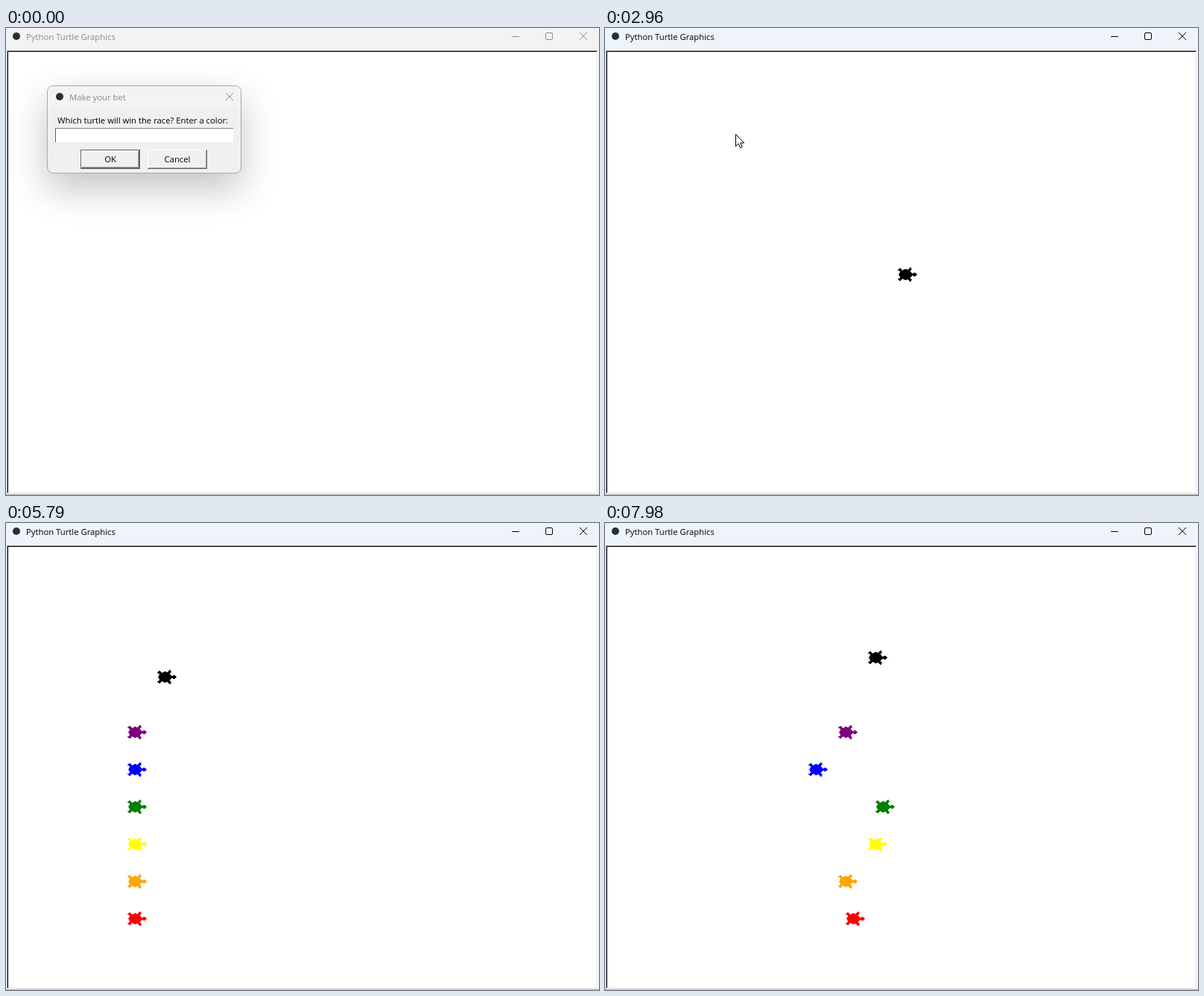
An HTML page for the animation above (8000 ms loop, 796 px wide and 626 px high).

```html
<!DOCTYPE html>
<html lang="en">
<head>
<meta charset="utf-8">
<title>Turtle race</title>
<style>
  html, body { margin: 0; width: 100%; height: 100%; overflow: hidden; background: #f0f0f0; }
  svg { position: absolute; display: block; }
  text { font: 11.3px "Open Sans", "Noto Sans", sans-serif; fill: #000; }
  .window {
    --on: 0;
    --ink: color-mix(in srgb, #000 calc(var(--on) * 100%), #8b8b8b);
    --bar: color-mix(in srgb, #eef4f9 calc(var(--on) * 100%), #f3f3f3);
  }
  .bar { fill: var(--bar); }
  .title { fill: var(--ink); }
  .glyph { fill: none; stroke: var(--ink); }
  .badge { fill: #22303a; }
  .middle { text-anchor: middle; }
  #stage, #overlay { left: 0; top: 0; }
  #dialog {
    position: absolute; left: 55px; top: 77px; width: 261px; height: 118px;
    box-sizing: border-box; border: 1px solid #a9a9a9; border-radius: 8px;
    overflow: hidden; background: #f0f0f0;
    box-shadow: 0 20px 50px rgb(0 0 0 / calc(.24 + .16 * var(--on)));
  }
  #dialog svg { left: -1px; top: -1px; }
</style>
</head>
<body>
<svg id="stage" class="window" width="796" height="626">
  <rect class="bar" width="796" height="30"/>
  <circle class="badge" cx="14" cy="11" r="5"/>
  <text class="title" x="27" y="16">Python Turtle Graphics</text>
  <path class="glyph" d="M679 11.5h10M770 6l10 10m0-10l-10 10"/>
  <rect class="glyph" x="724.5" y="6.5" width="9" height="9" rx="1.5"/>
  <g shape-rendering="crispEdges">
    <rect x="1" y="30" width="794" height="594" fill="#fff"/>
    <path d="M1.5 624V30.5H794" fill="none" stroke="#a0a0a0"/>
    <path d="M2.5 623V31.5H793" fill="none" stroke="#000"/>
    <path d="M793.5 31V623.5H2" fill="none" stroke="#e3e3e3"/>
    <path d="M0 625.5H796" stroke="#b4b4b4"/>
  </g>
  <g id="turtles" shape-rendering="crispEdges"></g>
</svg>

<div id="dialog" class="window">
  <svg width="261" height="118" viewBox="55 77 261 118">
    <rect class="bar" x="55" y="77" width="261" height="31"/>
    <circle class="badge" cx="72" cy="92" r="5"/>
    <text class="title" x="85" y="97">Make your bet</text>
    <path class="glyph" d="M295 87l10 10m0-10l-10 10"/>
    <text x="69" y="128">Which turtle will win the race? Enter a color:</text>
    <g shape-rendering="crispEdges" fill="none">
      <rect x="66" y="134" width="239" height="19" fill="#fff"/>
      <path d="M66 134.5H305" stroke="#808080"/>
      <path d="M66.5 134V153" stroke="#606060"/>
      <rect x="100.5" y="163.5" width="79" height="25" stroke="#646464"/>
      <path d="M101.5 187V164.5H178" stroke="#fff"/>
      <path d="M101 187.5H178.5V164" stroke="#696969"/>
      <path d="M102 186.5H177.5V165" stroke="#a0a0a0"/>
      <path d="M190.5 188V163.5H269" stroke="#fff"/>
      <path d="M190 188.5H269.5V163" stroke="#696969"/>
      <path d="M191 187.5H268.5V164" stroke="#a0a0a0"/>
    </g>
    <text class="middle" x="140" y="180">OK</text>
    <text class="middle" x="230" y="180">Cancel</text>
    <text id="entry" x="68" y="148"></text>
    <rect id="caret" y="136" width="2" height="15" shape-rendering="crispEdges"/>
  </svg>
</div>

<svg id="overlay" width="796" height="626">
  <path id="arrow" d="M.5 .5V16.5L4.2 13L6.8 18.7L9.3 17.6L6.8 12H11.8Z" fill="#fff" stroke="#000"/>
  <path id="beam" d="M-3.5-7h3m1 0h3M-3.5 8h3m1 0h3M0-7V8" fill="none" stroke="#444"/>
</svg>

<script>
const LOOP = 8000, TICK = 67.4, TICK_PHASE = 2620;
const HOME = { x: 402, y: 330.5 }, START_X = 172;
const HALF_SHELL = [[16, 0], [14, -2], [10, -1], [7, -4], [9, -7], [8, -9], [5, -6],
  [1, -7], [-3, -5], [-6, -8], [-8, -6], [-5, -4], [-7, 0]];

const RACE_TIMES = [5880, 6730, 7135, 7550, 7940];
// go/end: trip from the centre to the start line; race: distance at RACE_TIMES
const racers = [
  { color: "red",    y: 530.5, go: 3070, end: 3488, race: [0, 70, 110, 130, 160] },
  { color: "orange", y: 480.5, go: 3490, end: 3855, race: [0, 80, 120, 140, 150] },
  { color: "yellow", y: 430.5, go: 3857, end: 4190, race: [0, 90, 120, 160, 190] },
  { color: "green",  y: 380.5, go: 4270, end: 4552, race: [0, 70, 100, 150, 200] },
  { color: "blue",   y: 330.5, go: 4554, end: 4836, race: [0, 60, 80, 100, 110] },
  { color: "purple", y: 280.5, go: 4838, end: 5122, race: [0, 60, 90, 120, 150] },
  { color: "black",  y: 180.5, go: 5170, end: 5915, race: [0, 40, 70, 130, 190], shown: 2750 }
];
const typing = [[0, ""], [1160, "g"], [1420, "gr"], [1470, "gre"], [1680, "gree"],
  [1750, "green"], [1820, "greenm"], [2290, "green"]];

const $ = id => document.getElementById(id);
const ramp = (t, from, to) => Math.min(1, Math.max(0, (t - from) / (to - from)));
const mix = (a, b, p) => a + (b - a) * p;
const smooth = p => p * p * (3 - 2 * p);
const place = (el, x, y) => el.setAttribute("transform", `translate(${x} ${y})`);
const show = (el, on) => { el.style.visibility = on ? "visible" : "hidden"; };

const shell = [...HALF_SHELL, ...HALF_SHELL.slice(1, -1).reverse().map(([x, y]) => [x, -y])];
for (const racer of racers) {
  racer.el = document.createElementNS("http://www.w3.org/2000/svg", "polygon");
  racer.el.setAttribute("points", shell.join(" "));
  racer.el.setAttribute("fill", racer.color);
  racer.el.setAttribute("stroke", racer.color);
  racer.hops = 1 + Math.floor(Math.hypot(HOME.x - START_X, HOME.y - racer.y) / 11.979);
  $("turtles").append(racer.el);
}

function raceDistance(race, t) {
  let i = 0;
  while (i < RACE_TIMES.length - 2 && t > RACE_TIMES[i + 1]) i++;
  const d = mix(race[i], race[i + 1], ramp(t, RACE_TIMES[i], RACE_TIMES[i + 1]));
  return Math.round(d / 10) * 10;
}

function drawTurtles(t) {
  for (const { el, y, go, end, race, hops, shown = go } of racers) {
    const p = Math.round(ramp(t, go, end) * hops) / hops;
    show(el, t >= shown);
    place(el, mix(HOME.x, START_X, p) + raceDistance(race, t), mix(HOME.y, y, p));
  }
}

function drawDialog(t) {
  const dialog = $("dialog"), closing = ramp(t, 2600, 2810);
  dialog.style.setProperty("--on", ramp(t, 860, 1160));
  dialog.style.opacity = 1 - closing;
  dialog.style.transform = `scale(${1 - .1 * closing})`;
  $("stage").style.setProperty("--on", ramp(t, 2560, 2800));

  const entry = $("entry");
  entry.textContent = typing.findLast(([from]) => t >= from)[1];
  $("caret").setAttribute("x", Math.round(67 + entry.getComputedTextLength()));
  show($("caret"), t >= 920 && t < 2620 && (t - 920) % 900 < 600);
}

function drawPointer(t) {
  const enter = smooth(ramp(t, 194, 735)), leave = ramp(t, 5150, 5650) ** 2;
  const x = Math.round(mix(mix(708, 178, enter), -15, leave));
  const y = Math.round(mix(mix(602, 143, enter), 425, leave));
  const overEntry = t < 2620 && x < 305 && y > 134 && y < 153;
  const visible = t >= 194 && leave < 1;
  show($("beam"), visible && overEntry);
  show($("arrow"), visible && !overEntry);
  place($("beam"), x - .5, y - .5);
  place($("arrow"), x - 3, y - 1);
}

function draw(now) {
  const t = now % LOOP;
  const tick = TICK_PHASE + TICK * Math.floor((t - TICK_PHASE) / TICK);
  drawTurtles(tick);
  drawDialog(t);
  drawPointer(tick);
}

const start = performance.now();
(function frame() {
  draw(performance.now() - start);
  requestAnimationFrame(frame);
})();
</script>
</body>
</html>
```
